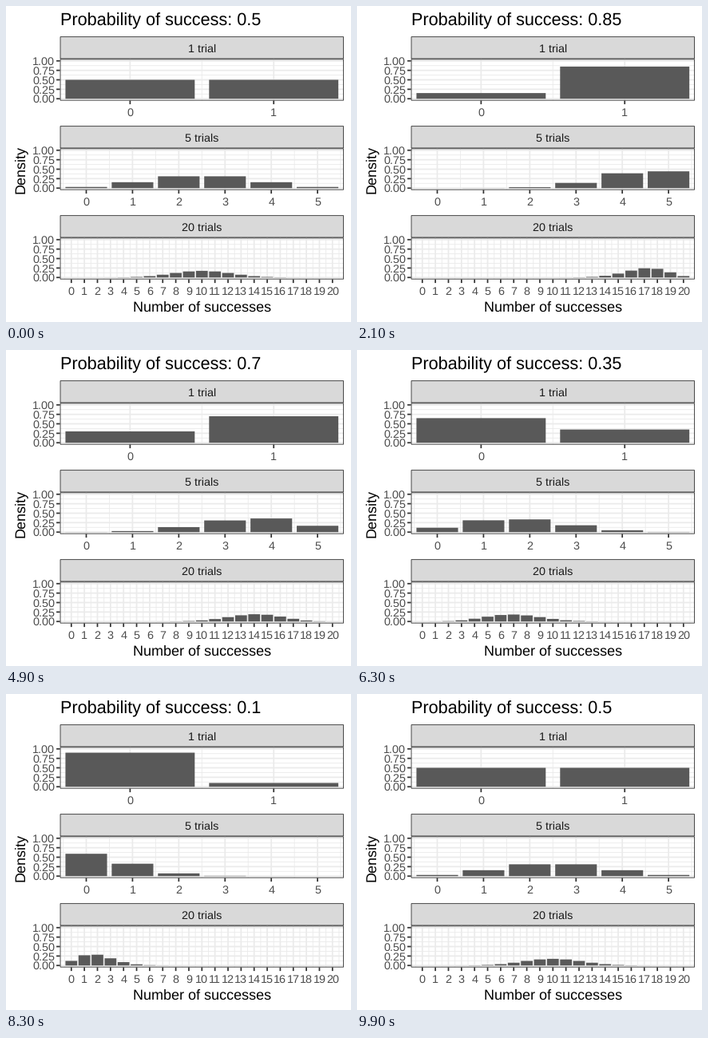
Recreate the animation shown at these times as a matplotlib script. Size 432 by 396 pixels, loop 10000 ms.

```python
from math import comb

import matplotlib.pyplot as plt
from matplotlib.animation import FuncAnimation
from matplotlib.patches import Rectangle

plt.rcParams["font.family"] = "Liberation Sans"
plt.rcParams["text.hinting"] = "none"

W, H, DPI = 432, 396, 72
FRAMES, INTERVAL = 100, 100

LEFT, RIGHT = 67.6, 423
MID = (LEFT + RIGHT) / 2
STRIP_TOP, PANEL_TOP, PANEL_BOTTOM = 38.2, 66.4, 118.6
STEP = 112
UNIT = (PANEL_BOTTOM - PANEL_TOP) / 1.1
PAD = (RIGHT - LEFT) * 0.02 / 1.04
LINE, TICK = 1.75, 4.5
INK, GRID, LABEL = "#333333", "#ebebeb", "#4d4d4d"

fig = plt.figure(figsize=(W / DPI, H / DPI), dpi=DPI, facecolor="white")
ax = fig.add_axes([0, 0, 1, 1])
ax.set_xlim(0, W)
ax.set_ylim(H, 0)
ax.axis("off")


def line(x0, y0, x1, y1, color, width, z):
    ax.plot([x0, x1], [y0, y1], color=color, lw=width, zorder=z,
            solid_capstyle="butt", snap=False)


def box(x, y, w, h, z, **style):
    return ax.add_patch(Rectangle((x, y), w, h, zorder=z, snap=False, **style))


def frame(top, bottom, fill, z):
    """Rectangle whose outline lies just inside its bounds."""
    lw = LINE / 2
    box(LEFT + lw / 2, top + lw / 2, RIGHT - LEFT - lw, bottom - top - lw, z,
        facecolor=fill, edgecolor=INK, lw=lw, joinstyle="miter")


def text(x, y, s, size, color="black", ha="center", **kw):
    return ax.text(x, y, s, fontsize=size, color=color, ha=ha,
                   va="baseline", **kw)


class Panel:
    def __init__(self, row, trials):
        self.trials = trials
        shift = row * STEP
        self.top, self.bottom = PANEL_TOP + shift, PANEL_BOTTOM + shift
        self.base = self.bottom - 0.05 * UNIT
        self.dx = (RIGHT - LEFT - 2 * PAD) / (trials + 0.9)

        frame(STRIP_TOP + shift, self.top, "#d9d9d9", 1)
        name = f"{trials} trial" + ("s" if trials > 1 else "")
        text(MID, 57.8 + shift, name, 14.4, "#1a1a1a")
        self.draw_grid()
        self.bars = [box(self.x(k) - 0.45 * self.dx, self.base, 0.9 * self.dx,
                         0, 3, facecolor="#595959", lw=0)
                     for k in range(trials + 1)]
        frame(self.top, self.bottom, "none", 4)

    def x(self, k):
        return LEFT + PAD + (k + 0.45) * self.dx

    def draw_grid(self):
        for i in range(9):
            y = self.base - i / 8 * UNIT
            major = i % 2 == 0
            line(LEFT, y, RIGHT, y, GRID, LINE if major else LINE / 2, 2)
            if major:
                line(LEFT - TICK, y, LEFT, y, INK, LINE, 2)
                text(LEFT - TICK - 1.8, y + 5.1, f"{i / 8:.2f}", 14.4, LABEL,
                     "right")
        for i in range(-1, 2 * self.trials + 2):
            x = self.x(i / 2)
            if not LEFT < x < RIGHT:
                continue
            major = i % 2 == 0
            line(x, self.top, x, self.bottom, GRID,
                 LINE if major else LINE / 2, 2)
            if major:
                line(x, self.bottom, x, self.bottom + TICK, INK, LINE, 2)
                text(x, self.bottom + 19, str(i // 2), 14.4, LABEL)

    def update(self, p):
        n = self.trials
        for k, bar in enumerate(self.bars):
            h = comb(n, k) * p ** k * (1 - p) ** (n - k) * UNIT
            bar.set_y(self.base - h)
            bar.set_height(h)


panels = [Panel(row, n) for row, n in enumerate((1, 5, 20))]
title = text(LEFT, 24.8, "", 21.6, ha="left")
text(MID, 383.2, "Number of successes", 18)
ax.text(22.5, (PANEL_TOP + PANEL_BOTTOM) / 2 + STEP, "Density", fontsize=18,
        rotation=90, rotation_mode="anchor", ha="center", va="baseline")

# Up from one half, down from one to zero, then back up to one half.
PROBS = [k / 20 for k in (*range(10, 21), *range(20, -1, -1), *range(0, 11))]


def state(i):
    """Three frames per step for the first 15 steps, two afterwards."""
    return i // 3 if i < 45 else 15 + (i - 45) // 2


def update(i):
    # The bars step one frame ahead of the title.
    ahead = min(i + 1, FRAMES - 1)
    for panel in panels:
        panel.update(PROBS[state(ahead)])
    title.set_text(f"Probability of success: {PROBS[state(i)]:g}")
    return [title]


anim = FuncAnimation(fig, update, frames=FRAMES, interval=INTERVAL,
                     repeat=True, repeat_delay=0, blit=False)
plt.show()
```
